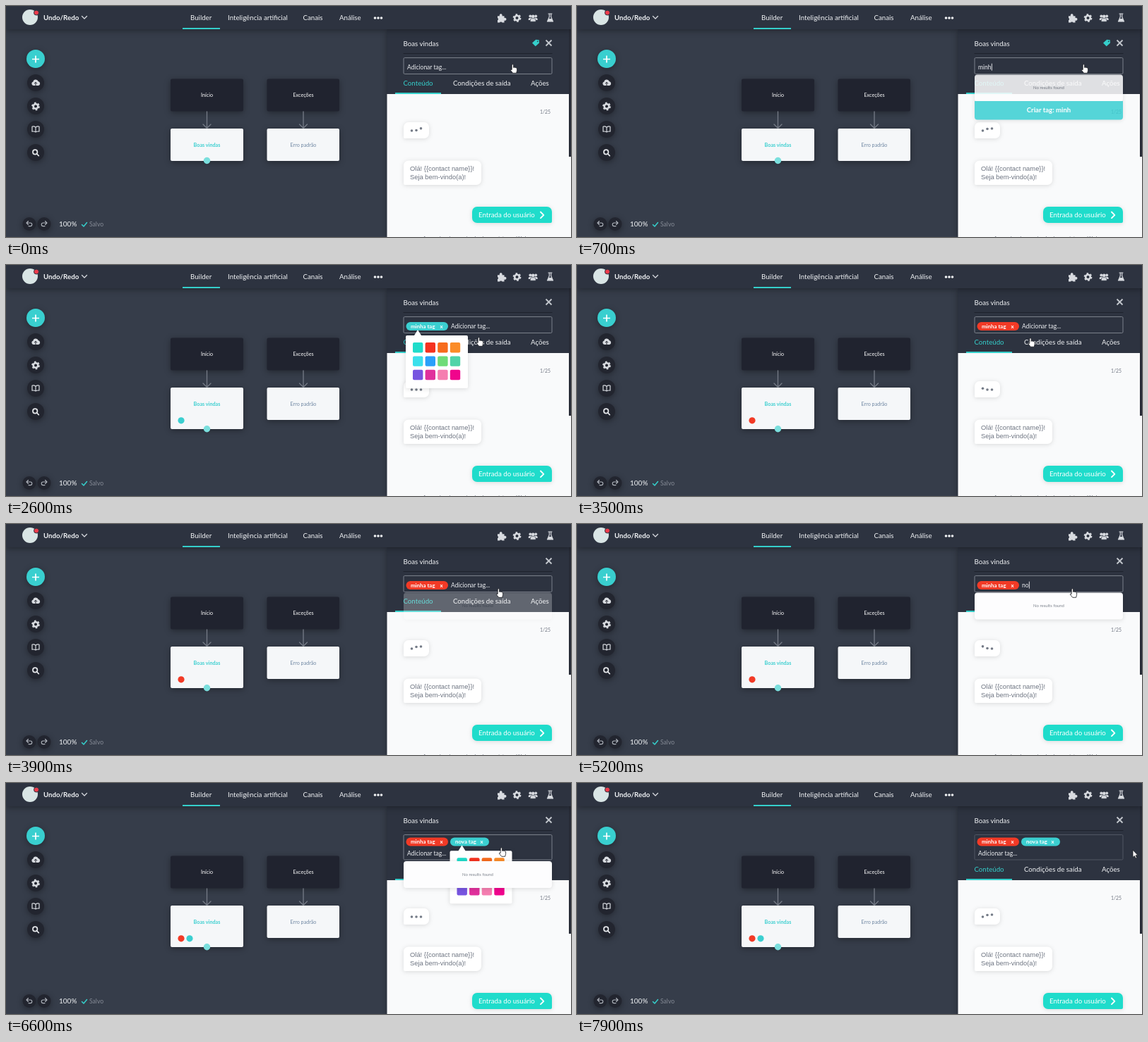
An HTML page that plays this animation: 800x328 px, repeating every 8000 ms.

```html
<!DOCTYPE html>
<html lang="pt-BR">
<head>
<meta charset="utf-8">
<title>Tags no builder</title>
<style>
  html, body { margin: 0; width: 100%; height: 100%; overflow: hidden; background: #363d4a; }
  svg { display: block; width: 100%; height: 100%; font-family: Lato, "Open Sans", sans-serif; }
  .nav { font-size: 9.7px; fill: #f1f3f5; }
  .node { font-size: 7.2px; text-anchor: middle; }
  .bold { font-weight: 700; }
  .input { font-size: 8.5px; fill: #eceef1; }
  .pill { font-size: 7.9px; font-weight: 700; fill: #fff; }
  .chat { font-family: "Liberation Sans", Arial, sans-serif; font-size: 9.4px; fill: #6d7481; }
  .soft { filter: drop-shadow(0 1px 3px rgba(0, 0, 0, .13)); }
  .lift { filter: drop-shadow(0 2px 4px rgba(0, 0, 0, .35)); }
  .line { fill: none; stroke-linecap: round; stroke-linejoin: round; }
</style>
</head>
<body>
<svg viewBox="0 0 800 328">
  <defs>
    <g id="gear" fill="none">
      <circle r="3.3" stroke="currentColor" stroke-width="2.6"/>
      <circle r="5" stroke="currentColor" stroke-width="1.8" stroke-dasharray="2.6 2.636"/>
    </g>
    <g id="arrowDown" class="line" stroke="#767c87">
      <path d="M0 0V23M-5.500 18L0 23.500L5.500 18" stroke-width="1.3"/>
    </g>
  </defs>

  <rect width="800" height="328" fill="#363d4a"/>

  <!-- Flow canvas -->
  <g class="lift">
    <rect x="233" y="103.500" width="103" height="46" rx="2" fill="#20232f"/>
    <rect x="369.500" y="103.500" width="102.500" height="46" rx="2" fill="#20232f"/>
    <rect id="welcome" x="233" y="174" width="103" height="46" rx="2" fill="#f5f7f9"/>
    <rect x="369.500" y="174" width="102.500" height="46" rx="2" fill="#f5f7f9"/>
  </g>
  <use href="#arrowDown" x="284.500" y="150"/>
  <use href="#arrowDown" x="421" y="150"/>
  <g class="node">
    <text x="284.500" y="129.300" fill="#fff">Início</text>
    <text x="421" y="129.300" fill="#fff">Exceções</text>
    <text x="284.500" y="199.800" fill="#3bcfd0" class="bold">Boas vindas</text>
    <text x="421" y="199.800" fill="#6f87a3">Erro padrão</text>
  </g>
  <circle id="port" cx="284.500" r="4.700" fill="#7adfdd"/>
  <circle id="dotA" cx="248" cy="220.800" r="4.600"/>
  <circle id="dotB" cx="260" cy="220.800" r="4.600" fill="#3bcfd0"/>

  <!-- Left tools -->
  <g class="lift">
    <circle cx="42" cy="75" r="13" fill="#39cfcf"/>
    <g fill="#22252f">
      <circle cx="42" cy="109" r="12"/><circle cx="42" cy="142" r="12"/>
      <circle cx="42" cy="175" r="12"/><circle cx="42" cy="208" r="12"/>
      <circle cx="33" cy="309.500" r="9.500"/><circle cx="54" cy="309.500" r="9.500"/>
    </g>
  </g>
  <path d="M42 70.500V80.500M37 75.500H47" stroke="#fff" stroke-width="1.700"/>
  <path d="M39 113a2.800 2.800 0 0 1-.6-5.500a3.800 3.800 0 0 1 7.300-.5a3.100 3.100 0 0 1 .3 6z" fill="#d9dce1"/>
  <path d="M42 112.500V108.500M40.300 110L42 108.300L43.700 110" class="line" stroke="#22252f"/>
  <use href="#gear" x="42" y="142.500" color="#d9dce1"/>
  <path d="M42 172.200Q39.500 170.400 37 171.200V178.200Q39.500 177.500 42 179Q44.500 177.500 47 178.200V171.200Q44.500 170.400 42 172.200V179" class="line" stroke="#d9dce1" stroke-width="1.200"/>
  <g class="line" stroke="#e6e8eb" stroke-width="1.700">
    <circle cx="41.200" cy="207.400" r="3.200"/><path d="M43.700 210L46.300 212.600"/>
  </g>
  <g class="line" stroke="#aeb3bb" stroke-width="1.100">
    <path d="M31.500 305.500L29 308L31.500 310.500M29 308H34.500a2.300 2.300 0 0 1 0 4.600H32"/>
    <path d="M55.500 305.500L58 308L55.500 310.500M58 308H52.500a2.300 2.300 0 0 0 0 4.600H55"/>
  </g>
  <text x="75" y="313" font-size="10" fill="#f1f3f5">100%</text>
  <path d="M107.500 310.500L110 313L114.500 307.500" class="line" stroke="#35cfcb" stroke-width="1.500"/>
  <text x="118" y="312.500" font-size="8.600" fill="#858b96">Salvo</text>

  <!-- Side panel -->
  <g class="lift"><rect x="539.500" y="33" width="261" height="296" fill="#2d3340"/></g>
  <text x="562.500" y="56.500" class="nav">Boas vindas</text>
  <path d="M562.500 67.500H773.500" stroke="#1e222c"/>
  <path id="tagIcon" d="M745 52.500L750.200 47.800L754.700 48.200L755 52.500L749.700 57.200zM752.700 49.400a.8.800 0 1 0 .1 0z" fill="#35cfcb" fill-rule="evenodd"/>
  <path d="M764.500 48.500L772.500 56.500M772.500 48.500L764.500 56.500" stroke="#c3c7cd" stroke-width="1.800"/>

  <g id="content">
    <rect x="539.500" y="125" width="260.500" height="210" fill="#f9fafb"/>
    <g class="nav">
      <text x="562.500" y="112.500" fill="#35cfcb">Conteúdo</text>
      <text x="633" y="112.500">Condições de saída</text>
      <text x="743" y="112.500">Ações</text>
    </g>
    <rect x="551" y="123" width="65" height="2" fill="#35cfcb"/>
    <text x="771" y="153" font-size="6.900" fill="#737985" text-anchor="end">1/25</text>
    <g class="soft" fill="#fff">
      <path d="M570 165H592a7 7 0 0 1 7 7V181a7 7 0 0 1-7 7H565a2 2 0 0 1-2-2V172a7 7 0 0 1 7-7z"/>
      <path d="M570 219.500H666a7 7 0 0 1 7 7V247a7 7 0 0 1-7 7H565a2 2 0 0 1-2-2V226.500a7 7 0 0 1 7-7z"/>
      <path d="M667 285H766a7 7 0 0 1 7 7V306a2 2 0 0 1-2 2H667a7 7 0 0 1-7-7V292a7 7 0 0 1 7-7z" fill="#1fdccb"/>
    </g>
    <g id="typing" fill="#747b87"></g>
    <text class="chat" x="572" y="234">Olá! {{contact name}}!</text>
    <text class="chat" x="572" y="246">Seja bem-vindo(a)!</text>
    <text x="669" y="300" font-size="9.700" fill="#fff">Entrada do usuário</text>
    <path d="M757 292.500L761.300 296.800L757 301.100" class="line" stroke="#fff" stroke-width="1.900"/>
    <text class="chat" x="590" y="332.200" style="font-size:8px">Aguardando a entrada do usuário no Web</text>
  </g>
  <rect x="797" y="33" width="3" height="181" fill="#272b36"/>

  <!-- Tag field -->
  <rect id="field" x="563" y="73.500" width="210" rx="1.500" fill="#2d3340"/>
  <g id="tagA">
    <rect x="566.500" y="81" width="59.500" height="12" rx="6"/>
    <text class="pill" x="573" y="89.700">minha tag</text><text class="pill" x="614.500" y="89.700">x</text>
  </g>
  <g id="tagB">
    <rect x="629" y="81" width="55" height="12" rx="6" fill="#3bcfd0"/>
    <text class="pill" x="636" y="89.700">nova tag</text><text class="pill" x="671.500" y="89.700">x</text>
  </g>
  <text id="entry" class="input" xml:space="preserve"></text>
  <path id="caret" d="M0 -8V2" stroke="#eceef1" stroke-width=".9"/>

  <g id="picker" class="soft">
    <path d="M568 100H578L583 92L588 100H652a2 2 0 0 1 2 2V173a2 2 0 0 1-2 2H568a2 2 0 0 1-2-2V102a2 2 0 0 1 2-2z" fill="#fff"/>
  </g>

  <g id="dropdown" class="soft">
    <rect x="563" y="97.500" width="210" height="38" rx="4" fill="#fdfdfe"/>
    <text x="668" y="118.300" font-size="6" text-anchor="middle" fill="#7c828c">No results found</text>
    <g id="create">
      <path d="M563 135H773V157.500a4 4 0 0 1-4 4H567a4 4 0 0 1-4-4z" fill="#3bcfd3"/>
      <text id="createText" class="bold" x="668" y="151" font-size="9.600" text-anchor="middle" fill="#fff"></text>
    </g>
  </g>

  <!-- Top bar -->
  <g class="lift"><rect width="800" height="33" fill="#2d3340"/></g>
  <circle cx="34" cy="16" r="11" fill="#d9e5e5"/>
  <circle cx="43" cy="9.500" r="3.500" fill="#ee3b4b" stroke="#2d3340"/>
  <text x="53" y="19.500" class="nav bold">Undo/Redo</text>
  <path d="M107.500 14.500L111 18L114.500 14.500" class="line" stroke="#d5d8dd" stroke-width="1.300"/>
  <g class="nav">
    <text x="261" y="19.500">Builder</text>
    <text x="314" y="19.500">Inteligência artificial</text>
    <text x="420.500" y="19.500">Canais</text>
    <text x="472" y="19.500">Análise</text>
  </g>
  <rect x="250" y="31" width="53" height="2" fill="#35cfcb"/>
  <g fill="#f1f3f5">
    <circle cx="522.500" cy="17" r="1.800"/><circle cx="527" cy="17" r="1.800"/><circle cx="531.500" cy="17" r="1.800"/>
  </g>
  <g fill="#d8dbe0">
    <path d="M696 14.200H699a2 2 0 1 1 3.400 0H705.500V17a2 2 0 1 1 0 3.500V23.500H702.500a1.900 1.900 0 0 0-3.400 0H696V20.300a1.900 1.900 0 0 0 0-3.400z"/>
    <use href="#gear" x="723.500" y="17" color="#d8dbe0"/>
    <circle cx="742.300" cy="14.300" r="1.900"/><circle cx="750.200" cy="14.300" r="1.900"/><circle cx="746.200" cy="14.800" r="2.300"/>
    <path d="M739.800 20V18.500q0-1.800 2.300-1.800h8.200q2.300 0 2.300 1.800V20z"/>
    <path d="M742.300 22.200V20q0-2.300 2.500-2.300h2.800q2.500 0 2.500 2.300v2.200z" stroke="#2d3340" stroke-width=".6"/>
    <path d="M768 11H773M769.300 11V15.500L766.500 22H774.500L771.700 15.500V11" class="line" stroke="#d8dbe0" stroke-width="1.200"/>
    <path d="M768.500 18H772.500L774.500 22H766.500z"/>
  </g>

  <path id="hand" d="M-2.800 1.500V-5a1.200 1.200 0 0 1 2.400 0V-1.500a1.100 1.100 0 0 1 2 .1a1 1 0 0 1 1.700.5a.9.900 0 0 1 1.300.9V2.500L3.700 6.300H-1.300L-4.600 2.200Q-5 .6-2.800 1.500z" fill="#fff" stroke="#15171c" stroke-width=".8"/>
  <path id="arrow" d="M0 -5V5.500L2.400 3.400L4 7L5.700 6.200L4.100 2.800H7.200z" fill="#fff" stroke="#15171c" stroke-width=".8"/>
</svg>
<script>
const LOOP = 8000, SHIFT = 13;
const TEAL = '#3bcfd0', RED = '#f23a26';
const FIRST_TAG = 1800, RECOLOR = 3100, SECOND_TAG = 6400, BLUR = 7400;
const SWATCHES = ['#1fdcca', '#f5321f', '#f76b1c', '#fb8c28',
                  '#3be0ec', '#2aa0fa', '#6fdc78', '#4fd4a8',
                  '#7755e0', '#e0309c', '#f57eb0', '#f0058c'];
const words = [
  { text: 'minha tag', keys: [350, 450, 550, 650, 850, 1000, 1150, 1300, 1420], done: FIRST_TAG, x: 568 },
  { text: 'nova tag', keys: [5050, 5150, 5300, 5420, 5570, 5720, 5850, 6000], done: SECOND_TAG, x: 630 }
];
const cursorPath = [[0, 719, 89], [2200, 719, 89], [2600, 671, 109], [3000, 601, 119], [3250, 601, 119],
                    [3800, 699, 98], [4500, 699, 98], [4800, 703, 98], [6950, 703, 98], [7400, 787, 100], [LOOP, 787, 100]];

const el = {};
document.querySelectorAll('[id]').forEach(node => el[node.id] = node);
const set = (node, attrs) => { for (const key in attrs) node.setAttribute(key, attrs[key]); };
const add = (parent, name, attrs) => {
  const node = document.createElementNS('http://www.w3.org/2000/svg', name);
  set(node, attrs);
  return parent.appendChild(node);
};
const show = (node, visible) => node.style.display = visible ? '' : 'none';
const move = (node, x, y) => set(node, { transform: `translate(${x} ${y})` });
const ramp = (t, from, to) => Math.min(1, Math.max(0, (t - from) / (to - from)));
const between = (t, from, to) => t >= from && t < to;

SWATCHES.forEach((fill, i) => add(el.picker, 'rect', {
  x: 576 + i % 4 * 17.6, y: 110 + Math.floor(i / 4) * 19.4, width: 14.4, height: 14.4, rx: 2, fill
}));
const dots = [0, 1, 2].map(i => add(el.typing, 'circle', { cx: 574.5 + i * 6.5, r: 1.8 }));

function cursorAt(t) {
  const i = cursorPath.findIndex(point => point[0] > t);
  const [t0, x0, y0] = cursorPath[i - 1], [t1, x1, y1] = cursorPath[i];
  const p = ramp(t, t0, t1), k = p * p * (3 - 2 * p);
  return [x0 + (x1 - x0) * k, y0 + (y1 - y0) * k];
}

function dropdownOpacity(t) {
  if (t < 3000) return ramp(t, 400, 750) * (1 - ramp(t, 2100, 2350));
  return ramp(t, 3800, 4200) * (1 - ramp(t, 6750, 7000));
}

function drawField(t) {
  const tagged = t >= FIRST_TAG, wrapped = t >= SECOND_TAG;
  const word = words.find(w => between(t, w.keys[0], w.done));
  const typed = word ? word.text.slice(0, word.keys.filter(key => key <= t).length) : '';
  const x = tagged && !wrapped ? 630 : 568, y = wrapped ? 102.7 : 89.7;

  set(el.field, { height: wrapped ? 35.5 : 23, stroke: t >= BLUR ? '#515763' : '#7b818b' });
  el.entry.textContent = typed || 'Adicionar tag...';
  set(el.entry, { x, y });
  show(el.caret, typed);
  if (typed) move(el.caret, x + el.entry.getComputedTextLength() + .8, y);

  show(el.create, word && typed.length > 2);
  el.createText.textContent = 'Criar tag: ' + typed;

  const lift = wrapped ? -3.5 : 0;
  show(el.tagA, tagged);
  show(el.tagB, wrapped);
  move(el.tagA, 0, lift);
  move(el.tagB, 0, lift);
  set(el.tagA.firstElementChild, { fill: t >= RECOLOR ? RED : TEAL });
}

function draw(t) {
  const tagged = t >= FIRST_TAG, wrapped = t >= SECOND_TAG;
  drawField(t);

  set(el.welcome, { height: tagged ? 59 : 46 });
  set(el.port, { cy: tagged ? 232.8 : 219.5 });
  show(el.dotA, tagged);
  show(el.dotB, wrapped);
  set(el.dotA, { fill: t >= RECOLOR ? RED : TEAL });
  show(el.tagIcon, !tagged);

  move(el.content, 0, wrapped ? SHIFT : 0);
  dots.forEach((dot, i) => {
    const offset = (t - 440 - i * 160 + 1200) % 800 - 400;
    const bump = Math.max(0, Math.cos(offset / 220 * Math.PI / 2));
    set(dot, { cy: 177 - 3.3 * (Math.abs(offset) < 220 ? bump : 0) });
  });

  show(el.picker, between(t, FIRST_TAG, RECOLOR + 100) || between(t, SECOND_TAG, BLUR));
  move(el.picker, wrapped ? 62.5 : 0, wrapped ? -3.7 : 0);

  const opacity = dropdownOpacity(t);
  show(el.dropdown, opacity > 0);
  set(el.dropdown, { opacity });
  move(el.dropdown, 0, wrapped ? SHIFT + .5 : 0);

  const [x, y] = cursorAt(t), outside = x > 775;
  show(el.hand, !outside);
  show(el.arrow, outside);
  move(outside ? el.arrow : el.hand, x, y);
}

const start = performance.now();
function tick() {
  draw((performance.now() - start) % LOOP);
  requestAnimationFrame(tick);
}
tick();
</script>
</body>
</html>
```
